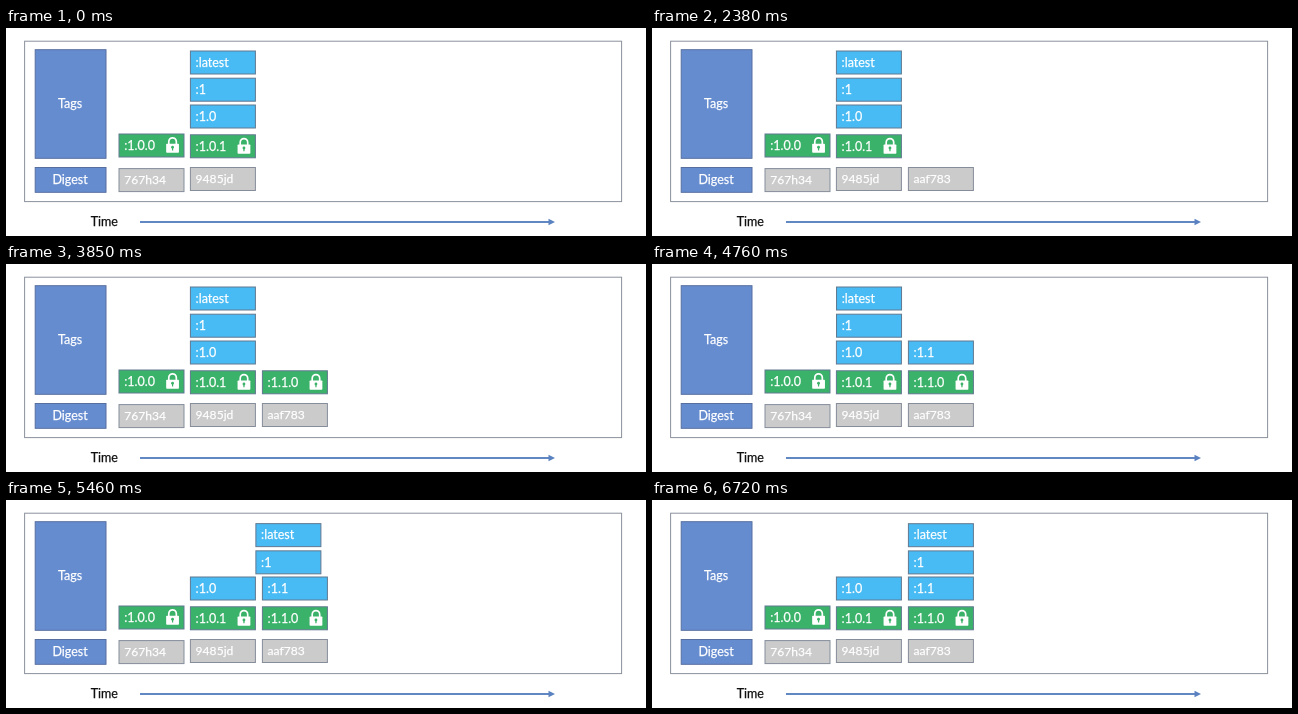
Write an HTML page that moves like this. It is 640 by 208 pixels and loops after 6790 ms.

```html
<!DOCTYPE html>
<html lang="en">
<head>
<meta charset="utf-8">
<title>Image tags over time</title>
<style>
  html, body { margin: 0; width: 100%; height: 100%; overflow: hidden; background: #fff; }
  svg { display: block; width: 640px; height: 208px; }
  text { font-family: Lato, "Open Sans", sans-serif; font-size: 12.5px; fill: #fff; stroke: #fff; stroke-width: .25; }
  rect { stroke: #617890; stroke-width: 1; }
  .time { fill: #111; stroke: #111; }
  .label text { text-anchor: middle; }
  .label rect { fill: #668cd0; stroke: #566f9f; }
  .tag rect { fill: #48bbf4; }
  .locked rect { fill: #3bb269; }
  .digest rect { fill: #cbcbcb; stroke: #858d9b; }
  .digest text { font-size: 12.1px; }
</style>
</head>
<body>
<svg id="stage" viewBox="0 0 640 208">
  <rect x="18.6" y="13.2" width="597" height="160.4" fill="#fff" style="stroke:#8a929d"/>
  <text class="time" x="84.7" y="198">Time</text>
  <path d="M134 194H543" stroke="#6288c4" stroke-width="1.8"/>
  <path d="M542.5 190.7L549 194L542.5 197.3Z" fill="#5b82c0"/>
</svg>
<script>
const LOOP = 6790, STEP = 70;
const NS = "http://www.w3.org/2000/svg";
const stage = document.getElementById("stage");

function add(parent, name, attrs) {
  const el = document.createElementNS(NS, name);
  for (const key in attrs) el.setAttribute(key, attrs[key]);
  return parent.appendChild(el);
}

function box(kind, label, x, y, width = 65, height = 23) {
  const g = add(stage, "g", { class: kind, transform: `translate(${x} ${y})` });
  add(g, "rect", { width, height });
  const textX = kind === "label" ? width / 2 - 0.5 : 5.2;
  add(g, "text", { x: textX, y: height / 2 + 4.3 }).textContent = label;
  if (kind === "locked") addLock(g);
  return g;
}

function addLock(parent) {
  const g = add(parent, "g", { transform: "translate(2.8 1) scale(.94)" });
  add(g, "path", { d: "M50 10V7a4 4 0 0 1 8 0V10", fill: "none", stroke: "#fff", "stroke-width": 1.8 });
  add(g, "path", { d: "M48 9.3H60Q60.8 9.3 60.8 10.1V18.2Q60.8 19 60 19H48Q47.2 19 47.2 18.2V10.1Q47.2 9.3 48 9.3Z", fill: "#fff" });
  add(g, "circle", { cx: 54, cy: 13, r: 1.5, fill: "#3bb269" });
  add(g, "path", { d: "M54 13V16.5", stroke: "#3bb269", "stroke-width": 1.3 });
}

box("label", "Tags", 29.2, 21.7, 70.8, 108.6);
box("label", "Digest", 29.2, 139.5, 70.8, 24.8);
box("locked", ":1.0.0", 113, 106);
box("digest", "767h34", 113, 140.6);
box("tag", ":1.0", 184.4, 77);
box("locked", ":1.0.1", 184.4, 106.8);
box("digest", "9485jd", 184.4, 139.5);

const fades = [
  { el: box("digest", "aaf783", 256.4, 139.5), start: 1540 },
  { el: box("locked", ":1.1.0", 256.4, 106.8), start: 2660 },
  { el: box("tag", ":1.1", 256.4, 77), start: 4200 }
];
const movers = [
  { el: box("tag", ":latest", 184.4, 23), y: 23 },
  { el: box("tag", ":1", 184.4, 50.2), y: 50.2 }
];

const progress = (t, start, length) => Math.min(1, Math.max(0, (t - start) / length));
const ease = p => (1 - Math.cos(Math.PI * p)) / 2;

function draw(t) {
  for (const { el, start } of fades) el.setAttribute("opacity", progress(t, start, 500));
  const p = ease(progress(t, 4735, 900));
  for (const { el, y } of movers) {
    el.setAttribute("transform", `translate(${184.4 + 72 * p} ${y + 0.7 * p})`);
  }
}

const began = performance.now();
function tick() {
  const t = (performance.now() - began) % LOOP;
  draw(Math.floor(t / STEP) * STEP);
  requestAnimationFrame(tick);
}
tick();
</script>
</body>
</html>
```
